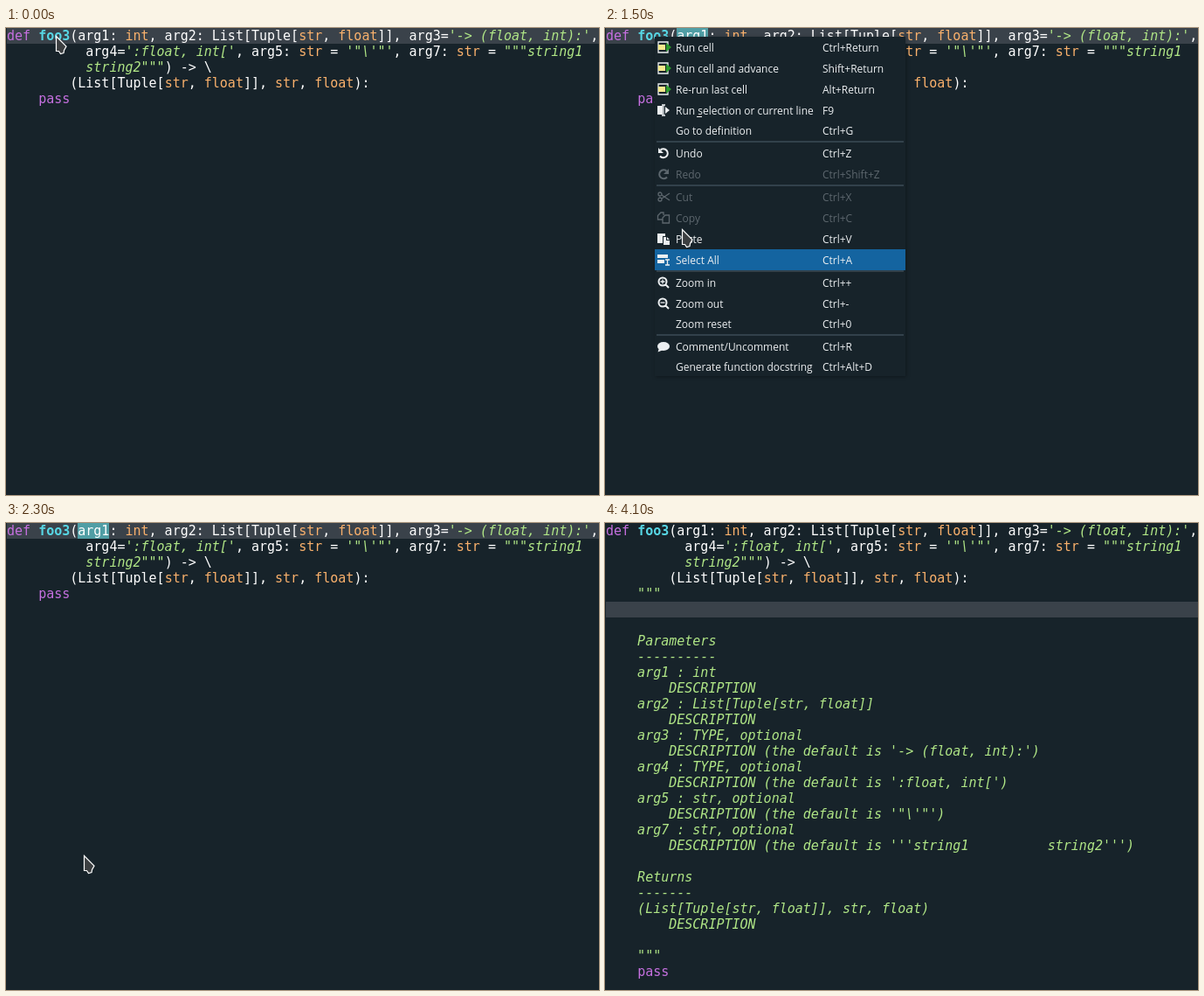
An HTML page for the animation above (4.2 s loop, 679 by 534 pixels).

```html
<!DOCTYPE html>
<html lang="en">
<meta charset="utf-8">
<title>Generate docstring</title>
<style>
html, body { margin: 0; width: 100%; height: 100%; overflow: hidden; background: #17232a; }
body > * { position: absolute; margin: 0; }
pre { left: 1px; top: 0; color: #fff; font: 15px/18px "DejaVu Sans Mono", monospace; }
pre b { color: #c670e0; font-weight: normal; }
pre strong { color: #57d6e4; }
pre u { color: #fab16c; text-decoration: none; }
pre i { color: #b0e686; }
#doc { top: 72px; color: #b0e686; font-style: italic; }
#line { left: 1px; right: 0; height: 18px; background: #3a424a; }
#occ { left: 82px; top: 0; width: 36px; height: 18px; background: #509ea5; }
#caret { width: 2px; height: 18px; background: #e4dfd6; }
svg { left: 0; top: 0; }
svg text { font: 12px "Open Sans", "Noto Sans", sans-serif; stroke: none; }
.off { color: #5d676e; }
#menu { color: #eceff1; fill: currentColor; filter: drop-shadow(1px 1px 2px #0005); }
.l { fill: none; stroke: currentColor; stroke-width: 1.3; }
.w { fill: none; stroke: currentColor; stroke-width: 2; }
</style>
<div id="line"></div>
<div id="occ"></div>
<pre><b>def</b> <strong>foo3</strong>(arg1: <u>int</u>, arg2: List[Tuple[<u>str</u>, <u>float</u>]], arg3=<i>'-> (float, int):'</i>,
          arg4=<i>':float, int['</i>, arg5: <u>str</u> = <i>'"\'"'</i>, arg7: <u>str</u> = <i>"""string1</i>
          <i>string2"""</i>) -> \
        (List[Tuple[<u>str</u>, <u>float</u>]], <u>str</u>, <u>float</u>):</pre>
<pre id="doc">    """


    Parameters
    ----------
    arg1 : int
        DESCRIPTION
    arg2 : List[Tuple[str, float]]
        DESCRIPTION
    arg3 : TYPE, optional
        DESCRIPTION (the default is '-> (float, int):')
    arg4 : TYPE, optional
        DESCRIPTION (the default is ':float, int[')
    arg5 : str, optional
        DESCRIPTION (the default is '"\'"')
    arg7 : str, optional
        DESCRIPTION (the default is '''string1          string2''')

    Returns
    -------
    (List[Tuple[str, float]], str, float)
        DESCRIPTION

    """</pre>
<pre id="pass">    <b>pass</b></pre>
<div id="caret"></div>
<svg width="679" height="534">
  <g id="menu"></g>
  <path id="arrow" d="M.5 .5V17.5H3.5L5.5 20.5L9 19.5L9.5 16.5L12 12z" fill="#3c3f41" stroke="#fff" stroke-width="1.2"/>
  <g id="beam" fill="none">
    <path d="M-4.5-8H4.5M0-8V8M-4.5 8H4.5" stroke="#111" stroke-width="3"/>
    <path d="M-4-8H-1.5L0-7L1.5-8H4M0-7V7M-4 8H-1.5L0 7L1.5 8H4" stroke="#fff" stroke-width="1.4"/>
  </g>
</svg>
<script>
const $ = id => document.getElementById(id);
const line = d => `<path class="l" d="${d}"/>`;
const bold = d => `<path class="w" d="${d}"/>`;
const solid = d => `<path d="${d}"/>`;

const cell = line('M-6-6H5V6H-6z') +
  '<path d="M-6-3H2V3H-6z" fill="#f5e98c"/><path d="M3-5L9 0L3 5z" fill="#2c9a2c"/>';
const turn = bold('M-3.5-3.5A5 5 0 1 1-4 3.5') + solid('M-6-6V0H0z');
const lens = bold('M3.5-1A4.5 4.5 0 1 1-5.5-1A4.5 4.5 0 1 1 3.5-1M2.5 2.5L6 6');
const icons = {
  cell, undo: turn, redo: `<g transform="scale(-1 1)">${turn}</g>`,
  run: solid('M-7-5H-1V5H-7zM2-4L7 0L2 4z') + line('M-2-6H2M0-6V6M-2 6H2'),
  cut: line('M-6-3A2 2 0 1 1-2-3A2 2 0 1 1-6-3M-6 3A2 2 0 1 1-2 3A2 2 0 1 1-6 3M-2-2L7 4M-2 2L7-4'),
  copy: line('M-1 2H-6.5V-2.5L-3-6H0V-3M-1 6V0L2-3H6.5V6z'),
  paste: solid('M-7-6H2V-3H-1V5H-7zM0-2H3V2H7V7H0zM4-2L7 1H4z'),
  all: solid('M-7-6H5V-2H-7zM-7 0H1V4H-7z') + line('M2 0H7M4.5 0V6M2 6H7'),
  zoomIn: lens + line('M-3.5-1H1.5M-1-3.5V1.5'),
  zoomOut: lens + line('M-3.5-1H1.5'),
  note: '<ellipse rx="7" ry="5"/>' + solid('M-5 2L-6.5 6.5L0 4z')
};

const rows = [
  [22, 'Run cell', 'Ctrl+Return', 'cell'],
  [46, 'Run cell and advance', 'Shift+Return', 'cell'],
  [70, 'Re-run last cell', 'Alt+Return', 'cell'],
  [94, 'Run selection or current line', 'F9', 'run'],
  [117, 'Go to definition', 'Ctrl+G'],
  [143, 'Undo', 'Ctrl+Z', 'undo'],
  [167, 'Redo', 'Ctrl+Shift+Z', 'redo', 'off'],
  [193, 'Cut', 'Ctrl+X', 'cut', 'off'],
  [217, 'Copy', 'Ctrl+C', 'copy', 'off'],
  [241, 'Paste', 'Ctrl+V', 'paste'],
  [265, 'Select All', 'Ctrl+A', 'all'],
  [291, 'Zoom in', 'Ctrl++', 'zoomIn'],
  [315, 'Zoom out', 'Ctrl+-', 'zoomOut'],
  [338, 'Zoom reset', 'Ctrl+0'],
  [364, 'Comment/Uncomment', 'Ctrl+R', 'note'],
  [387, 'Generate function docstring', 'Ctrl+Alt+D']
];

$('menu').innerHTML =
  '<rect x="57" y="10" width="287" height="388" fill="#17232a"/>' +
  '<rect id="hover" x="57" width="287" fill="#1464a0"/>' +
  [129, 179, 277, 350].map(y => `<rect x="59" y="${y}" width="283" height="2" fill="#32414b"/>`).join('') +
  '<rect x="105" y="101" width="6" height="1"/>' +
  rows.map(([y, label, keys, icon, state = '']) =>
    `<g class="${state}" fill="currentColor"><g transform="translate(67 ${y})">${icons[icon] || ''}</g>
    <text x="81" y="${y + 5}">${label}</text><text x="249" y="${y + 5}">${keys}</text></g>`).join('');

// time, pointer, x, y, hovered row
const moves = [
  [0, 'arrow', 57, 9],
  [500, 'beam', 57, 9],
  [700, 'arrow', 57, 9],
  [1400, 'arrow', 74, 100, 4],
  [1500, 'arrow', 88, 230, 10],
  [1600, 'arrow', 89, 300, 13],
  [1700, 'arrow', 89, 339, 14],
  [2000, 'arrow', 89, 380, 15],
  [2500, 'beam', 91, 381],
  [3500, 'beam', 93, 345],
  [3600, 'beam', 96, 250],
  [3700, 'beam', 96, 140],
  [3800, 'beam', 93, 51],
  [3900, '']
];

function show(id, on) { $(id).style.display = on ? '' : 'none'; }

function draw(now) {
  const t = now % 4200;
  const within = (a, b) => t >= a && t < b;
  const done = t >= 2500;
  const [, pointer, x, y, row] = moves.findLast(m => m[0] <= t);

  for (const id of ['arrow', 'beam']) {
    show(id, id === pointer);
    if (id === pointer) $(id).setAttribute('transform', `translate(${x} ${y})`);
  }
  show('menu', within(700, 2300));
  show('hover', row !== undefined);
  if (row !== undefined) {
    const [mid, , , icon] = rows[row], half = icon ? 12 : 11;
    $('hover').setAttribute('y', mid - half);
    $('hover').setAttribute('height', 2 * half);
  }
  show('occ', within(500, 4100));
  show('doc', done);
  $('line').style.top = done ? '90px' : 0;
  $('pass').style.top = done ? '504px' : '72px';
  show('caret', within(700, 900) || within(2500, 2900) || within(3500, 3900));
  $('caret').style.left = done ? '37px' : '117px';
  $('caret').style.top = done ? '90px' : 0;
  // the menu hides the lower part of the first line
  $('caret').style.height = done ? '18px' : '10px';
  requestAnimationFrame(draw);
}
draw(performance.now());
</script>
</html>
```
